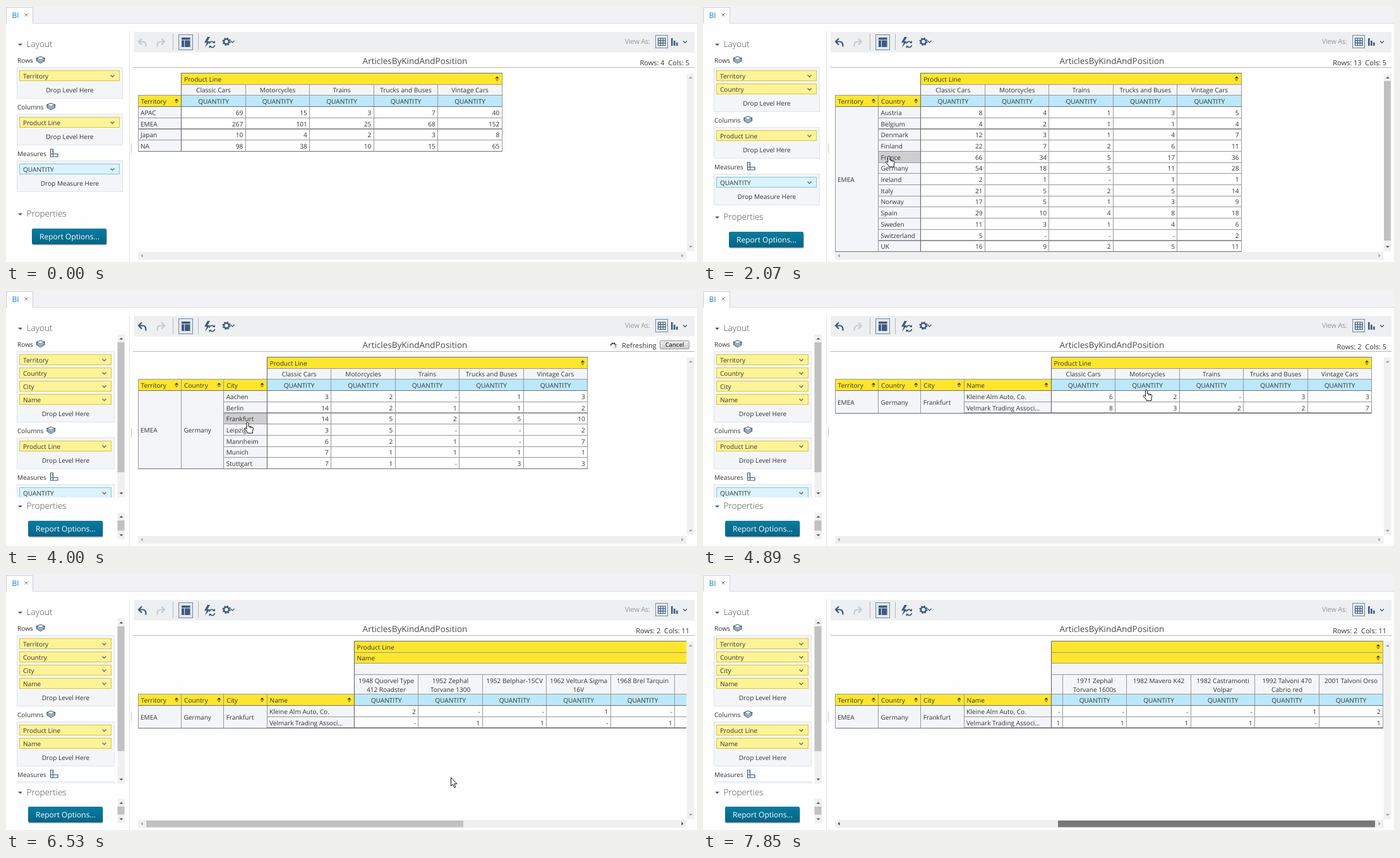
These frames come from a looping animation (1094 px wide and 406 px high, 8000 ms). An HTML page:

```html
<!DOCTYPE html>
<html lang="en">
<head>
<meta charset="utf-8">
<title>Pivot drill-down</title>
<style>
html, body { margin: 0; width: 100%; height: 100%; overflow: hidden; background: #fefefe; }
svg { display: block; width: 100%; height: 100%; }
text { font-family: "Open Sans", "Noto Sans", sans-serif; font-size: 10.1px; fill: #333; text-rendering: geometricPrecision; white-space: pre; }
</style>
</head>
<body>
<svg id="stage" viewBox="0 0 1094 406">
  <defs>
    <linearGradient id="teal" x2="0" y2="1"><stop stop-color="#087c9f"/><stop offset="1" stop-color="#046587"/></linearGradient>
    <linearGradient id="grey" x2="0" y2="1"><stop stop-color="#eee"/><stop offset="1" stop-color="#ccc"/></linearGradient>
    <clipPath id="viewport"><rect x="551" y="106" width="526.5" height="283"/></clipPath>
  </defs>
  <g id="frame"></g>
  <g id="scene"></g>
</svg>
<script>
const LOOP = 8000;
const ASKED = [1500, 2530, 4000, 5640];
const READY = [1570, 2570, 4030, 5710];
const INK = '#3d5a80', PALE = '#c3ccd6';
const HEAD = '#f4f5f8', YELLOW = '#ffe62e', BLUE = '#bde8fb', HOVER = '#cfcfcf';

const LEVELS = ['Territory', 'Country', 'City', 'Name'];
const EDGES = [209, 277.5, 344.7, 413, 551];
const COL = 101.5, ROW = 17.7, TOP = 106.5;
const LINES = ['Classic Cars', 'Motorcycles', 'Trains', 'Trucks and Buses', 'Vintage Cars'];
const PARENTS = ['EMEA', 'Germany', 'Frankfurt'];
const MODELS = ['1948 Quorvel Type/412 Roadster', '1952 Zephal/Torvane 1300', '1952 Belphar-15CV',
  '1962 VelturA Sigma/16V', '1968 Brel Tarquin', '1970 Gallard/Skylance', '1971 Zephal/Torvane 1600s',
  '1982 Mavero K42', '1982 Castramonti/Volpar', '1992 Talvoni 470/Cabrio red', '2001 Talvoni Orso'];
const BUYERS = ['Kleine Alm Auto, Co.', 'Velmark Trading Associ...'];
const parse = s => s.split(';').map(row => {
  const [name, values] = row.split(':');
  return [name, values.split(' ')];
});
const TABLES = [
  parse('APAC:69 15 3 7 40;EMEA:267 101 25 68 152;Japan:10 4 2 3 8;NA:98 38 10 15 65'),
  parse('Austria:8 4 1 3 5;Belgium:4 2 1 1 4;Denmark:12 3 1 4 7;Finland:22 7 2 6 11;France:66 34 5 17 36;' +
    'Germany:54 18 5 11 28;Ireland:2 1 - 1 1;Italy:21 5 2 5 14;Norway:17 5 1 3 9;Spain:29 10 4 8 18;' +
    'Sweden:11 3 1 4 6;Switzerland:5 - - - 2;UK:16 9 2 5 11'),
  parse('Aachen:3 2 - 1 3;Berlin:14 2 1 1 2;Frankfurt:14 5 2 5 10;Leipzig:3 5 - - 2;Mannheim:6 2 1 - 7;' +
    'Munich:7 1 1 1 1;Stuttgart:7 1 - 3 3'),
  parse(`${BUYERS[0]}:6 2 - 3 3;${BUYERS[1]}:8 3 2 2 7`),
  parse(`${BUYERS[0]}:2 - - 1 - - - - - 1 2;${BUYERS[1]}:- 1 1 - 1 1 1 1 1 - 1`)
];

const POINTER = [[500, 553, 355], [1170, 258, 191.5], [1750, 258, 191.5], [2210, 310, 257.5], [2960, 310, 257.5],
  [3600, 382.5, 209.5], [4350, 382.5, 209.5], [4890, 702, 158], [5140, 692, 142.6], [5350, 606, 127],
  [6250, 606, 127], [6530, 704.5, 322.5], [6780, 708, 392.5]];
const DRAG = [[7000, 0], [7320, 113], [7850, 340]];
const TRAVEL = 340, OVERFLOW = COL * MODELS.length - 526;

const rect = (x, y, w, h, fill, stroke = 'none', extra = '') =>
  `<rect x="${x}" y="${y}" width="${w}" height="${h}" fill="${fill}" stroke="${stroke}" ${extra}/>`;
const path = (d, fill, stroke = 'none', width = 1, extra = '') =>
  `<path d="${d}" fill="${fill}" stroke="${stroke}" stroke-width="${width}" ${extra}/>`;
const text = (x, y, s, style = '', anchor = 'start') =>
  `<text x="${x}" y="${y}" text-anchor="${anchor}" style="${style}">${s}</text>`;
const vline = (x, y1, y2, color) => path(`M${x} ${y1}V${y2}`, 'none', color);
const chevron = (x, y, color = INK) => path(`M${x - 3} ${y - 1.5}l3 3 3-3`, 'none', color, 1.3);
const tri = (x, y, turn, color, size = 3) =>
  path(`M${-size} ${size / 2}h${2 * size}l${-size} ${-size}z`, color, 'none', 0, `transform="translate(${x} ${y}) rotate(${turn})"`);
const at = (shift, body) => `<g transform="translate(${shift})">${body}</g>`;

function along(points, t) {
  const next = points.findIndex(p => p[0] > t);
  if (next === 0) return points[0].slice(1);
  if (next < 0) return points[points.length - 1].slice(1);
  const a = points[next - 1], b = points[next], k = (t - a[0]) / (b[0] - a[0]);
  return a.slice(1).map((v, i) => v + (b[i + 1] - v) * k);
}
const pointerAt = t => t < 500 || t >= 7030 ? null : along(POINTER, t);
const countPassed = (times, t) => times.filter(x => x <= t).length;

function staticFrame() {
  const bolt = path('M319 49l-5 9h4l-3 8 8-10h-4l4-7z', INK) +
    path('M322 60a4.2 4.2 0 0 1 7.5-2M330.5 62a4.2 4.2 0 0 1-7.5 2', 'none', INK, 1.7) +
    path('M331 55v4h-4zM321.500 67v-4h4z', INK);
  const gear = `<circle cx="349" cy="56.500" r="4" fill="none" stroke="${INK}" stroke-width="2.4"/>` +
    `<circle cx="349" cy="56.500" r="5.600" fill="none" stroke="${INK}" stroke-width="2" stroke-dasharray="2.200 2.200"/>`;
  const layoutButton = rect(273.5, 45.5, 22, 24, '#e3e9ef', '#7389a5') +
    rect(278, 50, 13.5, 3.5, INK) + rect(278, 54.5, 4, 10.5, INK) + rect(283, 54.5, 8.5, 10.5, INK);
  const gridButton = rect(1028.5, 46.5, 19, 20, '#e9eef3', '#7389a5') +
    path('M1032.500 51h11.500v11.500h-11.500zM1032.500 54.800h11.500M1032.500 58.600h11.500M1036.300 51v11.500M1040.200 51v11.500', 'none', INK, 1.2);
  return rect(0, 0, 1094, 27, '#f2f2f5') + path('M43 27.500H1094', 'none', '#dadbe8') +
    path('M.5 28V2.500H42.500V28', '#fefefe', '#c9cde2') +
    text(9.5, 19, 'BI', 'font-size:12px;fill:#1a80c6') + path('M29.500 11.500l5 5m0-5l-5 5', 'none', '#777') +
    vline(195.5, 40, 406, '#e4e4e6') + vline(198.5, 218, 234, '#c4c4c8') +
    rect(202, 41, 888, 32.5, '#eeeff0') + vline(264.5, 44, 70, '#b4b8be') + vline(304.5, 44, 70, '#b4b8be') +
    layoutButton + bolt + gear + chevron(358.5, 56.5) +
    text(980, 60, 'View As:', 'font-size:11px;font-weight:300;fill:#666') + gridButton +
    rect(1053, 51, 2.6, 12, INK) + rect(1057, 55, 2.6, 8, INK) + rect(1061, 58, 2.6, 5, INK) + chevron(1075, 57) +
    text(647.5, 92, 'ArticlesByKindAndPosition', 'font-size:13.5px;fill:#4c4c4c', 'middle') +
    path('M201 97.500H1090', 'none', '#b9b9bd') +
    tri(22.5, 61.5, 180, INK, 3.5) + text(32.5, 65, 'Layout', 'font-size:13.6px;font-weight:300;fill:#4c4c4c');
}

function vbar(x, y1, y2, thumb) {
  const arrow = thumb ? '#555' : '#999';
  return rect(x, y1, 11.5, y2 - y1, '#f0f0f1') + (thumb ? rect(x, thumb[0], 11, thumb[1] - thumb[0], '#c1c1c1') : '') +
    tri(x + 6, y1 + 6.5, 0, arrow) + tri(x + 6, y2 - 6.5, 180, arrow);
}

function shelf(y, title, chips, width, measure) {
  const middle = 17 + width / 2, depth = 21 * (chips.length - 1);
  const icon = measure
    ? path('M70.500 79v12h11.500v-4.500h-7.500v-7.500zM70.500 86.500h4v4.500M72.500 82h2', HEAD, INK, 1.2)
    : path('M48.500 82.500l6-2.500 6.500 2.500-6.500 3zM48.500 82.500v4.500l6 3.500 6.500-3.500v-4.500M48.500 85l6 3 6.500-3', HEAD, INK, 1.1,
      `transform="translate(${title === 'Columns' ? 16.5 : 0} 0)"`);
  const list = chips.map((name, i) => {
    const top = 102 + 21 * i;
    return rect(21.5, top + .5, width - 10, 16, measure ? '#dbf3fd' : '#fff398', measure ? '#7cc6e8' : '#d9c440') +
      text(27, top + 13, name) + chevron(width + .5, top + 9, '#667');
  }).join('');
  return at(`0 ${y}`, text(18, 89.7, title) + icon + rect(17.5, 97.5, width - 1, 49 + depth, HEAD, '#dbe5ef') + list +
    text(middle, 137 + depth, `Drop ${measure ? 'Measure' : 'Level'} Here`, '', 'middle'));
}

function sidebar(side) {
  const scrolls = side > 1, width = scrolls ? 155 : 168;
  const rows = LEVELS.slice(0, side + 1), cols = side > 3 ? ['Product Line', 'Name'] : ['Product Line'];
  const rowGrowth = 21 * Math.min(side, 3), colGrowth = 21 * (cols.length - 1);
  const bottom = [320, 325, 325, 329, 332.5][side], props = [329.5, 334.5, 339, 342.5, 346][side];
  const left = scrolls ? 35 : 41, top = Math.round(props + 23);
  let out = `<clipPath id="shelves"><rect x="0" y="70" width="190" height="${bottom - 70}"/></clipPath><g clip-path="url(#shelves)">` +
    shelf(0, 'Rows', rows, width) + shelf(74 + rowGrowth, 'Columns', cols, width) +
    shelf(148 + rowGrowth + colGrowth, 'Measures', ['QUANTITY'], width, true) + '</g>' +
    tri(22.5, props + 1, 180, INK, 3.5) + text(32.5, props + 4.5, 'Properties', 'font-size:13.6px;font-weight:300;fill:#4c4c4c') +
    rect(left + 1, top + 1.5, 118, 25, '#bbb', 'none', 'rx="2"') +
    rect(left, top, 118, 25, 'url(#teal)', 'none', 'rx="2"') +
    text(left + 59.5, top + 17, 'Report Options...', 'font-size:12px;fill:#fff', 'middle');
  if (scrolls) {
    out += vbar(176.5, 70.5, bottom, [83, [297, 289, 281][side - 2]]) +
      vbar(176.5, props + 10.5, 395.5, [props + 23, 381.5]);
  }
  return out;
}

function table(view, scroll, tip, hoverTip) {
  let overHot = false;
  const inside = (p, x, y, w, h) => p && p[0] >= x && p[0] < x + w && p[1] >= y && p[1] < y + h;
  const sort = (x, y) => tri(x, y - 2.2, 0, '#333', 3.2) + tri(x, y + 2.2, 180, '#8b7c1c', 2.8);
  function cell(x, y, w, h, fill, label, { align = 'start', hot = false, sorted = false, offset = 0 } = {}) {
    const px = x - offset;
    if (hot && inside(tip, px, y, w, h)) overHot = true;
    if (hot && inside(hoverTip, px, y, w, h)) fill = HOVER;
    const x1 = Math.floor(x), y1 = Math.floor(y), x2 = Math.floor(x + w), y2 = Math.floor(y + h);
    const tx = align === 'middle' ? x + w / 2 + .3 : align === 'end' ? x + w - 3.6 : x + (sorted ? 4.6 : 4);
    const lines = label.split('/');
    const base = Math.round(h > 25 && align === 'middle' ? y + 13.3 : y + h / 2 + 4.4);
    return rect(x1 + .5, y1 + .5, x2 - x1, y2 - y1, fill, '#979799') +
      lines.map((s, i) => text(tx, base + 14 * i, s, '', align)).join('') + (sorted ? sort(x + w - 7.5, y + h / 2) : '');
  }

  const data = TABLES[view], depth = Math.min(view, 3) + 1, start = EDGES[depth];
  const detailed = view === 4, names = detailed ? MODELS : LINES, span = COL * names.length;
  const body = TOP + 3 * ROW + (detailed ? 49 : 0), measureY = body - ROW, height = ROW * data.length;
  const x = i => start + COL * i;
  const moved = { offset: scroll };

  let grid = cell(start, TOP, span, ROW, YELLOW, 'Product Line', { sorted: true });
  if (detailed) {
    grid += cell(start, TOP + ROW, span, ROW, YELLOW, 'Name', { sorted: true }) +
      cell(start, TOP + 2 * ROW, span, ROW, HEAD, 'Classic Cars', { ...moved, align: 'middle', hot: true });
  }
  const namesY = TOP + ROW * (detailed ? 3 : 1);
  names.forEach((name, i) => {
    grid += cell(x(i), namesY, COL, measureY - namesY, HEAD, name, { ...moved, align: 'middle', hot: !detailed }) +
      cell(x(i), measureY, COL, ROW, BLUE, 'QUANTITY', { ...moved, align: 'middle', hot: true });
    data.forEach(([, values], r) => {
      grid += cell(x(i), body + ROW * r, COL, ROW, '#fefefe', values[i], { align: 'end' });
    });
  });
  grid = at(`${-scroll} 0`, grid);
  if (detailed) grid = `<g clip-path="url(#viewport)">${grid}</g>`;

  let heads = '';
  for (let d = 0; d < depth; d++) {
    const w = EDGES[d + 1] - EDGES[d];
    heads += cell(EDGES[d], measureY, w, ROW, YELLOW, LEVELS[d], { sorted: true });
    if (d < depth - 1) heads += cell(EDGES[d], body, w, height, HEAD, PARENTS[d], { hot: true });
    else data.forEach(([name], r) => { heads += cell(EDGES[d], body + ROW * r, w, ROW, HEAD, name, { hot: d < 3 }); });
  }
  const snap = v => Math.floor(v) + .5;
  const edge = snap(start), end = snap(body + height), right = detailed ? 1077 : snap(start + span);
  const outline = path(`M${edge} ${end}V${snap(TOP)}H${right}M209.500 ${end}H${right}M209.500 ${snap(body)}H${right}`, 'none', '#707073', 1.2);
  return { svg: grid + heads + outline, overHot };
}

function status(t, view, busy) {
  if (!busy) {
    const rows = TABLES[view].length, cols = view > 3 ? MODELS.length : LINES.length;
    return text(1082, 93.7, `Rows: ${rows}\u00a0 Cols: ${cols}`, 'font-size:11px', 'end');
  }
  let dots = '';
  const turn = Math.floor((t - ASKED[0]) / 30) % 8;
  for (let i = 0; i < 6; i++) {
    const a = (i + turn) * Math.PI / 4 + 1.2;
    dots += `<circle cx="${961.5 + 4 * Math.cos(a)}" cy="${88.5 + 4 * Math.sin(a)}" r="1.500" fill="#222" opacity="${1 - Math.abs(i - 1.5) * .24}"/>`;
  }
  return dots + text(975, 91.7, 'Refreshing', 'font-size:11px') + rect(1035.5, 80.5, 46, 13, 'url(#grey)', '#999', 'rx="1"') +
    text(1058.5, 90.3, 'Cancel', 'font-size:9.3px;font-weight:600', 'middle');
}

function bottomBar(view, shift, t, tip) {
  const active = view === 4, dark = '#444', dim = '#a0a0a0';
  const thumb = t >= 7030 ? '#787878' : tip && tip[1] > 390 ? '#a8a8a8' : '#c1c1c1';
  return rect(209, 390, 868.5, 12.5, '#f0f0f1') + (active ? rect(222 + shift, 391, 502, 10.5, thumb) : '') +
    tri(215, 396, -90, active && shift > 0 ? dark : dim) + tri(1071, 396, 90, active && shift < TRAVEL ? dark : dim);
}

function cursor([x, y], hand) {
  const shape = hand
    ? path('M-1.500 2a1.500 1.500 0 0 1 3 0V6.500l5.500 1.200q2 .5 2 2.600L8 14v3.500H0V16l-4.500-5q-.8-2 1-2l2 1.700zM3.800 7.200v2.300M6.200 7.700v2', '#fff', '#111')
    : path('M0 0v13.500l3-2.800 2.300 5.300 2.100-.9-2.300-5.100h4.400z', '#fff', '#111');
  return at(`${x} ${y}`, shape);
}

function draw(t) {
  const side = countPassed(ASKED, t), view = countPassed(READY, t);
  const shift = along(DRAG, t < 7030 ? 0 : t)[0], scroll = Math.round(shift * OVERFLOW / TRAVEL);
  // Highlights trail the pointer slightly.
  const tip = pointerAt(t), pivot = table(view, scroll, tip, pointerAt(t - 40));
  const undo = path('M215 51.500l-5 5 5 5M210.500 56.500h6.500q5 .5 4.500 8', 'none', side ? INK : PALE, 2.2);
  const redo = path('M246 51.500l5 5-5 5M250.500 56.500h-6.500q-5 .5-4.500 8', 'none', PALE, 2.2);
  return undo + redo + sidebar(side) + status(t, view, side > view) + pivot.svg +
    vbar(1078, 107, 388.5, view === 1 ? [119, 372] : null) + bottomBar(view, shift, t, tip) +
    (tip ? cursor(tip, pivot.overHot) : '');
}

document.getElementById('frame').innerHTML = staticFrame();
const scene = document.getElementById('scene');
const began = performance.now();
let shown = '';
function tick() {
  const next = draw((performance.now() - began) % LOOP);
  if (next !== shown) scene.innerHTML = shown = next;
  requestAnimationFrame(tick);
}
tick();
</script>
</body>
</html>
```
